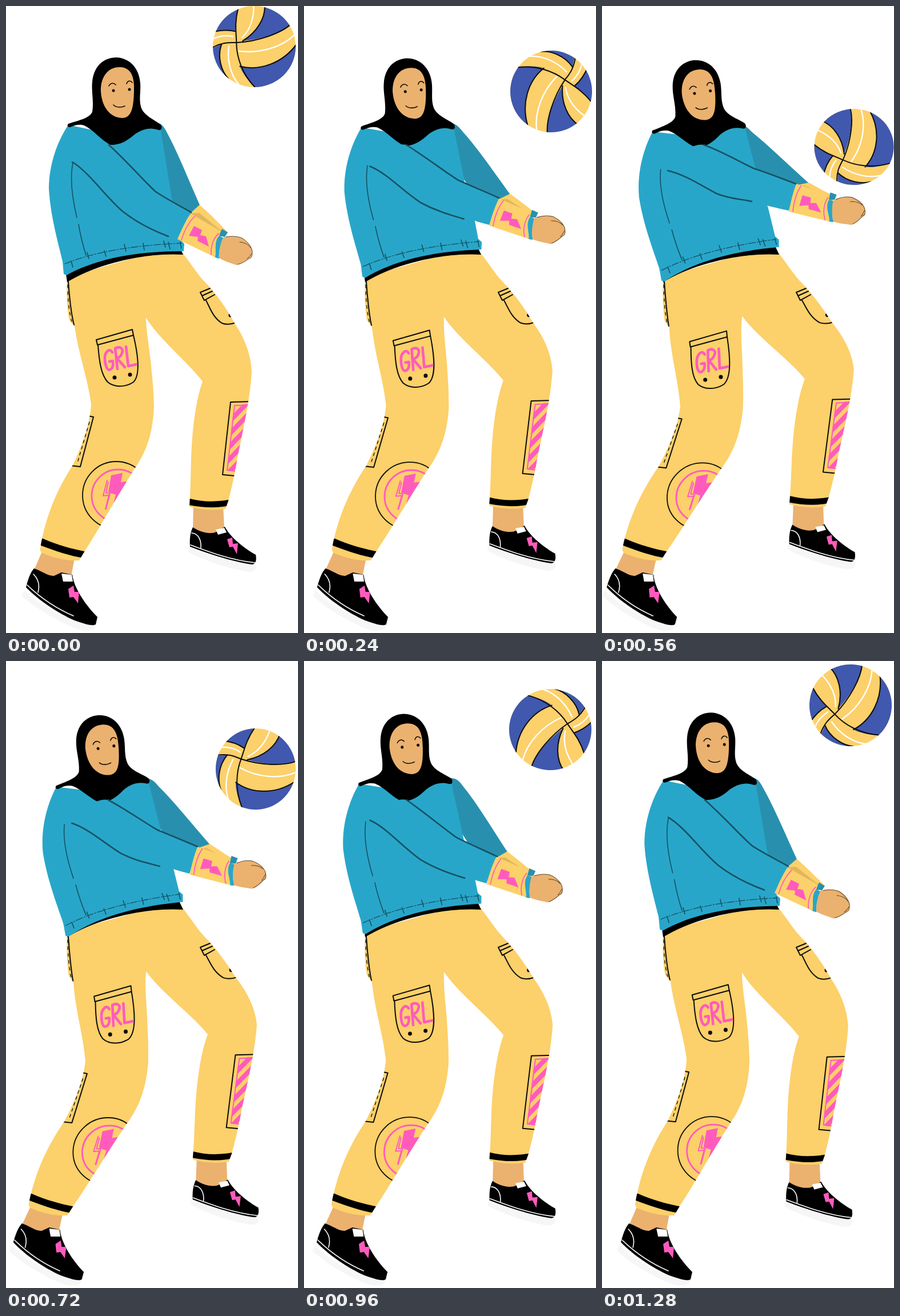
Write an HTML page that moves like this. It is 511 px wide and 1097 px high and loops after 1.36 s.

```html
<!DOCTYPE html>
<html lang="en">
<head>
<meta charset="utf-8">
<title>Volleyball player</title>
<style>
  html, body { margin: 0; width: 100%; height: 100%; overflow: hidden; background: #fff; }
  svg { display: block; width: 100vw; height: 100vh; }
  .yellow { fill: #fcd06a; }
  .skin { fill: #ebb16f; }
  .teal { fill: #28a6c9; }
  .pink { fill: #ff5bbd; }
  .blue { fill: #4058ae; }
  .white { fill: #fff; }
  .shade { fill: #f6f6f6; }
  .line { fill: none; stroke: #0b0b0b; stroke-width: 2; stroke-linecap: round; stroke-linejoin: round; }
  .pinkline { fill: none; stroke: #ff5bbd; stroke-width: 2; stroke-linecap: round; stroke-linejoin: round; }
  .whiteline { fill: none; stroke: #fff; stroke-width: 1.6; stroke-linecap: round; }
  .fold { fill: none; stroke: #155263; stroke-width: 2.6; stroke-linecap: round; }
  .dot { stroke: #0b0b0b; stroke-width: 7; stroke-linecap: round; }
</style>
</head>
<body>
<svg viewBox="0 0 511 1097" preserveAspectRatio="none">
  <defs>
    <clipPath id="leftLeg"><path data-warp="left" d="M107 474 C106 500 106 530 111 550 L120 560 C127 610 143 650 149 697 C147 730 135 765 117 803 C90 845 70 890 60 948 C59 953 61 956 65 958 C85 966 105 971 128 970 L137 955 C160 920 190 865 226 808 C245 780 257 750 259 700 C258 670 257 660 255 640 C253 610 245 570 245 545 L262 520 L262 430 Z"/></clipPath>
    <clipPath id="rightLeg"><path data-warp="right" d="M245 545 C265 580 320 625 344 657 C332 690 326 740 324 790 C323 830 323 850 321 876 C340 882 365 883 384 880 L389 866 C396 840 402 810 405 790 C415 740 427 690 430 640 C429 610 417 580 400 555 C385 527 365 500 350 485 C335 470 322 448 308 431 L240 431 Z"/></clipPath>
    <clipPath id="patch"><path data-warp="right" d="M399 698 L432 696 L412 816 L387 813 Z"/></clipPath>
    <clipPath id="round"><circle r="72"/></clipPath>
  </defs>

  <g id="ball">
    <g clip-path="url(#round)">
      <circle r="73" class="yellow"/>
      <g transform="translate(-435 -71)">
        <path class="blue" d="M360 46 L380 8 L407 3 C402 20 403 32 402 44 C390 41 378 41 360 46 Z M453 -4 C455 20 440 45 415 61 C445 58 482 48 500 30 L490 0 Z M410 106 C445 115 485 100 509 66 L510 100 L470 146 L437 144 C424 131 414 118 410 106 Z M358 76 L378 67 C370 90 378 115 390 128 L360 110 Z"/>
        <path class="line" stroke-width="1.6" d="M407 3 C400 30 404 50 404 64 C404 90 414 120 437 144 M360 74 C380 62 395 64 404 64 C440 62 482 48 500 30 M453 -4 C455 20 440 45 415 61 M378 67 C370 90 378 115 390 128 M410 106 C445 115 485 100 509 66 M360 46 C378 41 390 41 402 44"/>
        <path class="whiteline" style="stroke-width:2.4" d="M434 0 C434 22 427 42 414 55 M408 79 C445 84 482 72 504 51 M391 70 C387 95 394 122 408 138 M362 58 C376 51 388 51 398 53"/>
      </g>
    </g>
  </g>

  <g data-warp="right">
    <path class="shade" d="M319 947 C350 960 400 974 437 977 C440 985 435 990 425 990 C395 986 345 970 319 955 Z"/>
    <path class="skin" d="M328 874 L327 918 C345 928 365 924 382 914 L380 874 Z"/>
    <path d="M327 912 C340 921 358 925 368 920 L383 911 C390 925 410 945 437 960 C439 970 437 977 430 977 C395 972 350 957 322 946 C321 930 323 920 327 912 Z"/>
    <path class="white" d="M367 916 L382 913 L386 921 L371 925 Z"/>
    <path class="whiteline" d="M325 922 C337 923 342 935 341 948 M323 943 C355 955 395 970 436 974"/>
    <path class="pink" d="M387 933 L396 930 L397 941 L406 940 L404 959 L397 946 L391 947 Z"/>
  </g>
  <g data-warp="left">
    <path class="shade" d="M32 1022 C60 1050 110 1078 157 1083 L154 1090 C142 1096 125 1092 108 1083 C75 1068 45 1048 28 1032 Z"/>
    <path class="skin" d="M65 950 L49 987 C70 1000 90 1000 114 998 L120 966 Z"/>
    <path d="M49 984 C60 987 74 998 84 997 L97 991 L116 995 C119 1018 138 1047 160 1069 L157 1082 C150 1086 135 1080 120 1075 C90 1062 55 1038 35 1017 C38 1005 42 992 49 984 Z"/>
    <path class="white" d="M97 993 L115 995 L117 1007 L100 1007 Z"/>
    <path class="whiteline" d="M48 994 C57 1003 59 1015 56 1026 M37 1013 C63 1038 90 1055 118 1067"/>
    <path class="pink" d="M109 1020 L118 1014 L120 1025 L128 1025 L126 1045 L118 1034 L111 1035 Z"/>
  </g>

  <g clip-path="url(#rightLeg)" data-warp="right">
    <path class="yellow" d="M230 420 L450 420 L450 890 L300 890 L230 560 Z"/>
    <path d="M315 860 C345 869 370 868 400 862 L400 872 C370 880 345 878 315 872 Z"/>
    <path class="line" d="M357 494 L340 501 L347 515 L365 505 M343 507 L361 499 M350 515 C357 528 362 545 378 555 C386 558 394 557 402 554"/>
    <path class="dot" d="M393 541 L393 541.1"/>
    <g id="stripes" clip-path="url(#patch)"></g>
    <path class="pinkline" d="M432 698 L400 699 L387 812 L412 815"/>
    <path class="line" d="M432 692 L393 693 L379 820 L412 823"/>
  </g>
  <g clip-path="url(#leftLeg)" data-warp="left">
    <path class="yellow" d="M90 420 L270 420 L280 700 L240 850 L140 990 L30 980 L90 700 Z"/>
    <path d="M55 930 L65 932 C90 943 115 950 142 955 L136 966 C110 962 85 953 50 940 Z"/>
    <path class="line" stroke-width="1.6" d="M109 482 C111 510 113 535 119 558"/>
    <path class="line" style="stroke-width:1.3;stroke-dasharray:5 7" d="M108 488 C108 510 110 535 115 552"/>
    <path class="line" d="M158 584 L221 566 L223 576 L160 593 Z M161 593 C163 620 166 645 178 658 C190 668 210 667 223 658 C236 645 231 610 223 576"/>
    <path class="dot" d="M190 650 L190 650.1 M217 645 L217 645.1"/>
    <g aria-label="GRL">
      <path class="pinkline" style="stroke-width:4.6" d="M186 606 C181 597 172 606 173 618 C174 632 178 640 184 635 C189 631 187 624 187 621 L181 622 M195 635 L191 599 C200 594 206 600 203 607 C202 612 198 615 194 616 L208 632 M210 596 L214 630 L228 627"/>
    </g>
    <path class="line" d="M143 717 L153 719 L130 806 L112 804"/>
    <path class="line" style="stroke-width:1.3;stroke-dasharray:5 6" d="M146 728 L125 799"/>
    <path class="line" style="stroke-width:1.8" d="M134 856 C134 823.4 160.4 797 193 797 C225.6 797 252 823.4 252 856 C252 888.6 225.6 915 193 915 C160.4 915 134 888.6 134 856 Z"/>
    <path class="pinkline" style="stroke-width:2.8" d="M150 857 C150 831.6 170.6 811 196 811 C221.4 811 242 831.6 242 857 C242 882.4 221.4 903 196 903 C170.6 903 150 882.4 150 857 Z"/>
    <path class="pink" d="M184 821 L204 817 L201 833 L217 831 L212 850 L185 883 L192 855 L179 851 Z"/>
    <path class="pinkline" d="M177 830 L170 857 L180 856 L174 880 M179 833 L175 852 L182 853 L175 880"/>
  </g>
  <path d="M104 462 C160 430 230 418 303 420 L310 435 C250 431 165 448 107 483 Z"/>

  <path fill="#2890ae" data-warp="sleeve" d="M262 204 C272 204 277 212 282 222 C300 255 322 310 339 348 L324 362 L291 342 L268 300 Z" data-to="M238 206 C250 206 256 215 263 221 C295 247 330 282 362 310 L342 314 L268 285 L250 260 Z"/>
  <g id="body">
    <path class="teal" d="M109 208 C88 240 75 280 75 320 C78 370 93 420 99 447 L101 469 L106 471 C160 441 230 429 311 429 L312 416 L306 410 L298 357 L291 342 L269 206 L190 225 Z"/>
    <path class="line" style="stroke:#155263;stroke-width:1.6" d="M117 275 C111 305 118 345 124 370 M127 382 C130 400 135 420 140 436 M114 446 L117 457 M142 431 L145 442 M172 428 L175 438 M207 417 L210 429 M240 415 L242 427 M276 411 L279 422 M284 413 L287 425 M305 413 L307 424"/>
    <path class="line" style="stroke:#155263;stroke-width:1.3;stroke-dasharray:12 3 2 3" d="M103 451 C150 432 215 419 307 415"/>
    <path d="M109 206 C128 200 147 196 151 185 C154 165 149 150 151 132 C154 104 172 90 193 90 C216 91 233 108 235 135 C236 152 232 165 237 179 C243 193 262 200 271 208 C274 213 272 218 267 217 C252 212 240 215 226 224 C213 235 202 243 183 243 C166 235 155 218 137 209 C127 206 120 209 112 212 C107 212 107 208 109 206 Z"/>
    <path class="skin" d="M166 150 C165 125 178 106 200 107 C220 108 225 125 224 150 C223 180 219 196 203 196 C182 195 168 177 166 150 Z"/>
    <path class="line" style="stroke-width:1.6" d="M180 140 C183 134 189 134 192 138 M211 136 C213 130 218 130 221 134 M188 173 C193 178 202 178 208 175"/>
    <path class="dot" style="stroke-width:5" d="M188 148 L188 148.1 M216 146 L216 146.1"/>
  </g>

  <g data-warp="sleeve">
    <path class="yellow" d="M339 348 C355 362 373 380 388 396 L374 404 L322 363 Z" data-to="M362 309 C378 318 393 326 409 334 L402 342 L338 314 Z"/>
    <path fill="#dfb65c" d="M338 362 L375 392 L388 396 L374 404 L322 363 Z" data-to="M355 314 L392 331 L409 334 L402 342 L338 314 Z"/>
    <path class="teal" d="M116 273 C150 240 170 240 180 243 C215 275 240 305 262 325 C285 340 305 350 325 362 L302 408 C270 398 235 382 205 360 C175 335 145 295 116 273 Z" data-to="M115 288 C140 250 165 240 178 243 C205 252 240 272 265 284 C290 292 315 302 341 312 L327 358 C305 353 285 349 262 342 C240 337 225 338 200 328 C170 312 145 295 115 288 Z"/>
    <path class="fold" d="M180 243 C215 275 240 305 262 325 C285 340 305 350 324 361" data-to="M178 243 C205 252 240 272 265 284 C290 292 315 302 339 311"/>
    <path class="fold" d="M116 273 C145 290 175 335 205 360 C228 378 255 392 284 403" data-to="M115 288 C145 295 170 312 200 328 C225 338 240 337 262 342 C275 346 285 348 298 351"/>
  </g>
  <g id="forearm">
    <path fill="#2890ae" d="M378 390 L388 396 L383 404 L372 402 Z"/>
    <path class="yellow" d="M323 363 L376 394 C370 408 367 425 367 440 L300 408 C307 392 314 376 323 363 Z"/>
    <path class="pinkline" style="stroke-width:1.7" d="M330 368 C319 379 312 393 307 409 M372 398 C362 407 358 423 359 435"/>
    <path class="pink" d="M329 385 L343 392 L340 401 L350 403 L355 421 L335 411 L336 404 L320 402 Z"/>
    <path class="teal" d="M373 402 L381 406 C375 418 372 430 373 442 L366 440 C369 428 363 413 373 402 Z"/>
    <path class="skin" d="M380 405 C387 402 405 403 413 406 C422 412 430 420 431 430 C431 437 430 441 425 442 C418 447 408 453 402 453 C395 450 383 447 373 441 C372 430 375 415 380 405 Z"/>
    <path class="line" style="stroke-width:1;stroke:#5b4322" d="M385 404 C395 402 406 403 413 406 C422 412 430 420 431 430 C431 437 430 441 425 442 C418 447 412 451 405 452 M409 413 C418 414 424 417 428 423 M422 442 C426 439 428 436 430 433"/>
  </g>
</svg>
<script>
const LOOP = 1360, STEP = 80, SPIN = 720 / LOOP;
const $ = id => document.getElementById(id);

// Diagonal bands of the shin patch
for (let y = 728; y < 880; y += 22) {
  const band = document.createElementNS("http://www.w3.org/2000/svg", "path");
  band.setAttribute("class", "pink");
  band.setAttribute("d", `M384 ${y} L434 ${y - 52} L434 ${y - 40} L384 ${y + 12} Z`);
  $("stripes").append(band);
}

const poseTimes = [0, 240, 400, 480, 560, 640, 720, 960, 1280, 1360];
const pose = {
  lean: [0, .41, .72, .87, 1, 1.04, 1.03, .62, .07, 0],
  step: [0, .45, .72, .86, 1, .93, .83, .48, .07, 0],
  lift: [0, .5, .98, 1.1, 1, .86, .72, .38, .04, 0],
  reach: [0, 10, 5, 2, 0, 0, 1, 8, 1, 0],
  turn: [0, -7, -11.8, -12.8, -11.8, -11.4, -11, -7, -.4, 0],
  ballX: [434.5, 432.5, 438.5, 441, 441, 439, 437, 431, 435, 434.5],
  ballW: [72.5, 71.5, 67.5, 67.5, 69.5, 70, 70, 72, 72, 72.5],
  ballH: [71, 71.5, 69.5, 66, 66.5, 69, 71, 71, 71.5, 71]
};
const ballTimes = [0, 80, 160, 240, 320, 400, 480, 560, 640, 720, 800, 880, 960, 1120, 1280, 1360];
const ballY = [71, 88, 115, 149.5, 194, 244.5, 262, 246.5, 216, 189, 164, 141, 120, 94, 77.5, 71];

const clamp = v => Math.max(0, Math.min(1, v));
const mix = (a, b, k) => a + (b - a) * k;

function sample(times, values, t) {
  let i = 1;
  while (times[i] < t) i++;
  return mix(values[i - 1], values[i], (t - times[i - 1]) / (times[i] - times[i - 1]));
}

const warps = {
  left: (x, y, p) => {
    const u = clamp((y - 545) / 400);
    return [x - p.step * .36 * Math.max(0, y - 545) ** .7, y + p.step * 4 * Math.sin(Math.PI * Math.sqrt(u))];
  },
  right: (x, y, p) => {
    const u = clamp((y - 510) / 140), bend = u * u * (3 - 2 * u);
    return [x + p.step * (11 * bend - Math.max(0, y - 650) * .018), y - p.step * 4.5 * bend];
  },
  sleeve: (x, y, p) => [x + p.reach * clamp((x - 180) / 140), y]
};

const numbers = d => d.match(/[\d.-]+/g).map(Number);
const shapes = [...document.querySelectorAll("path[data-warp], [data-warp] path")].map(el => {
  const d = el.getAttribute("d");
  return {
    el, d,
    from: numbers(d),
    to: el.dataset.to ? numbers(el.dataset.to) : null,
    warp: warps[el.closest("[data-warp]").dataset.warp]
  };
});

function bend({ el, d, from, to, warp }, p) {
  let i = 0;
  const at = n => to ? mix(from[n], to[n], p.lift) : from[n];
  el.setAttribute("d", d.replace(/[\d.-]+ [\d.-]+/g, () => {
    const [x, y] = warp(at(i), at(i + 1), p);
    i += 2;
    return x.toFixed(2) + " " + y.toFixed(2);
  }));
}

function draw(t) {
  const p = {};
  for (const key in pose) p[key] = sample(poseTimes, pose[key], t);
  shapes.forEach(s => bend(s, p));
  $("body").setAttribute("transform", `rotate(${-5.16 * p.lean} 230 440)`);
  const x = mix(311, 333, p.lift) + p.reach, y = mix(385, 335, p.lift);
  $("forearm").setAttribute("transform", `translate(${x} ${y}) rotate(${p.turn}) translate(-311 -385)`);
  $("ball").setAttribute("transform",
    `translate(${p.ballX} ${sample(ballTimes, ballY, t)}) scale(${p.ballW / 72} ${p.ballH / 72}) rotate(${t * SPIN})`);
}

let start = null, shown = -1;
function tick(now) {
  start ??= now;
  const t = Math.floor(((now - start) % LOOP) / STEP) * STEP;
  if (t !== shown) draw(shown = t);
  requestAnimationFrame(tick);
}
draw(0);
requestAnimationFrame(tick);
</script>
</body>
</html>
```
